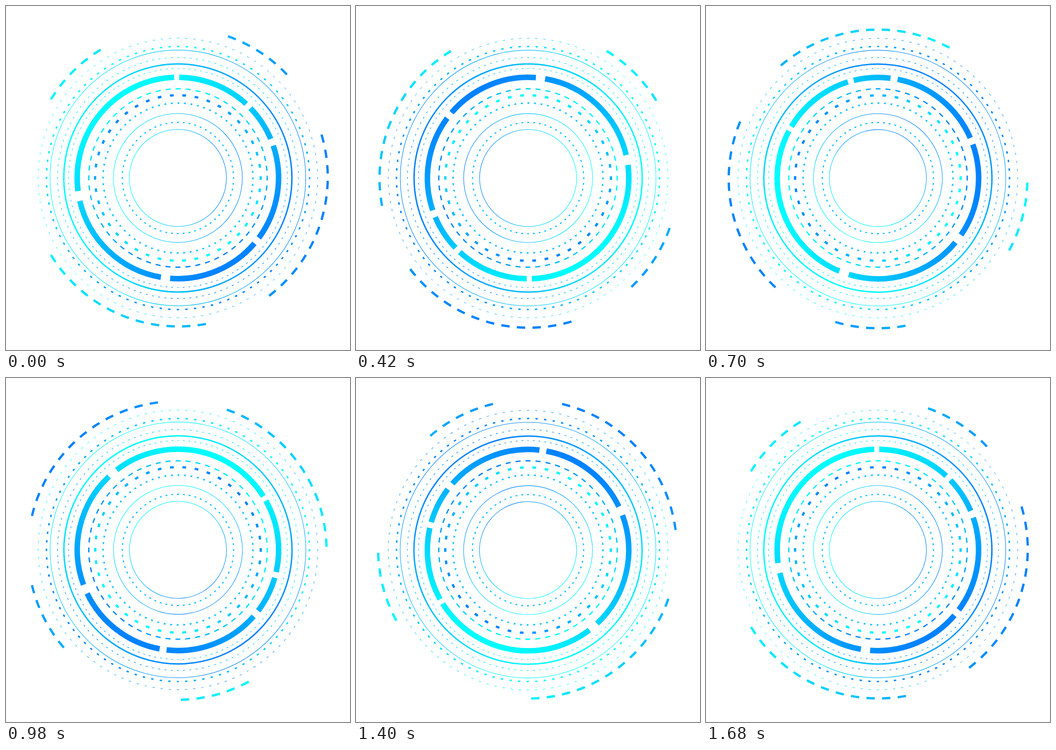
An HTML page with a canvas that plays this animation: 748 by 748 pixels, repeating every 1750 ms.

```html
<!DOCTYPE html>
<html lang="en">
<head>
<meta charset="utf-8">
<title>Rotating rings</title>
<style>
html, body { margin: 0; width: 100%; height: 100%; overflow: hidden; background: #fff; }
canvas { display: block; }
</style>
</head>
<body>
<canvas id="stage" width="748" height="748"></canvas>
<script>
const ctx = document.getElementById('stage').getContext('2d');
const STEP = 70, STEPS = 25, TURN = 24;
const TAU = 2 * Math.PI, rad = d => d * Math.PI / 180;

// Linear gradient across a ring, cyan at the given angle, blue opposite.
function tint(r, cyanAngle) {
  const x = r * Math.cos(rad(cyanAngle)), y = r * Math.sin(rad(cyanAngle));
  const g = ctx.createLinearGradient(x, y, -x, -y);
  g.addColorStop(0, '#00ffff');
  g.addColorStop(1, '#0080ff');
  ctx.strokeStyle = ctx.fillStyle = g;
}

function arc(r, width, from = 0, to = 360) {
  ctx.lineWidth = width;
  ctx.beginPath();
  ctx.arc(0, 0, r, rad(from), rad(to));
  ctx.stroke();
}

function line(r, width, cyanAngle) {
  tint(r, cyanAngle);
  arc(r, width);
}

function dashes(r, width, count, length) {
  ctx.setLineDash([length, TAU * r / count - length]);
  ctx.lineDashOffset = length / 2;
  arc(r, width);
  ctx.setLineDash([]);
}

function triangles(r, count, size) {
  for (let i = 0; i < count; i++) {
    ctx.save();
    ctx.rotate(TAU * i / count);
    ctx.translate(r, 0);
    ctx.beginPath();
    ctx.moveTo(0, -size);
    ctx.lineTo(size, size);
    ctx.lineTo(-size, size);
    ctx.fill();
    ctx.restore();
  }
}

// Draws a group that makes a whole number of turns per loop.
function spin(step, turns, dx, dy, draw) {
  ctx.save();
  ctx.translate(374, 374);
  ctx.rotate(TAU * turns * step / TURN);
  ctx.translate(dx, dy);
  draw();
  ctx.restore();
}

function outerArcs() {
  tint(325, 185);
  for (const [first, count] of [[0, 5], [9, 12], [25, 12], [47, 5]])
    for (let i = first; i < first + count; i++)
      arc(324.7, 5, i * 6 - 70.6, i * 6 - 67.4);
}

function forwardRings() {
  tint(304, 180);
  dashes(304, 1, 108, 5);
  line(278, 1.1, 180);
  line(248, 3, 180);
  tint(225, -125);
  for (const [from, to] of [[-89.2, -47.3], [-43.9, -22.8], [-18.7, 36.5],
                            [40.5, 94.4], [99.7, 166.8], [172.5, 267.9]])
    arc(219, 12, from, to);
  tint(182, 70);
  dashes(180, 5, 42, 8);
  line(140.2, 1.1, 180);
  ctx.strokeStyle = '#00bcff';
  dashes(121, 2.4, 60, 4);
  line(105.6, 1.1, 180);
}

function backwardRings() {
  tint(286, -115);
  dashes(286, 3.2, 96, 5);
  dashes(262, 1.3, 120, 4);
  dashes(238, 1.2, 120, 4);
  tint(194, -110);
  dashes(194, 2.8, 56, 11);
  tint(163, -120);
  triangles(163, 72, 2.5);
}

function render(now) {
  const step = Math.floor(now / STEP) % STEPS;
  ctx.clearRect(0, 0, 748, 748);
  spin(step, 1, 0.9, -1.8, outerArcs);
  spin(step, 2, -0.3, -0.1, forwardRings);
  spin(step, -3, 0, 0, backwardRings);
}

const start = performance.now();
function frame() {
  render(performance.now() - start);
  requestAnimationFrame(frame);
}
frame();
</script>
</body>
</html>
```
